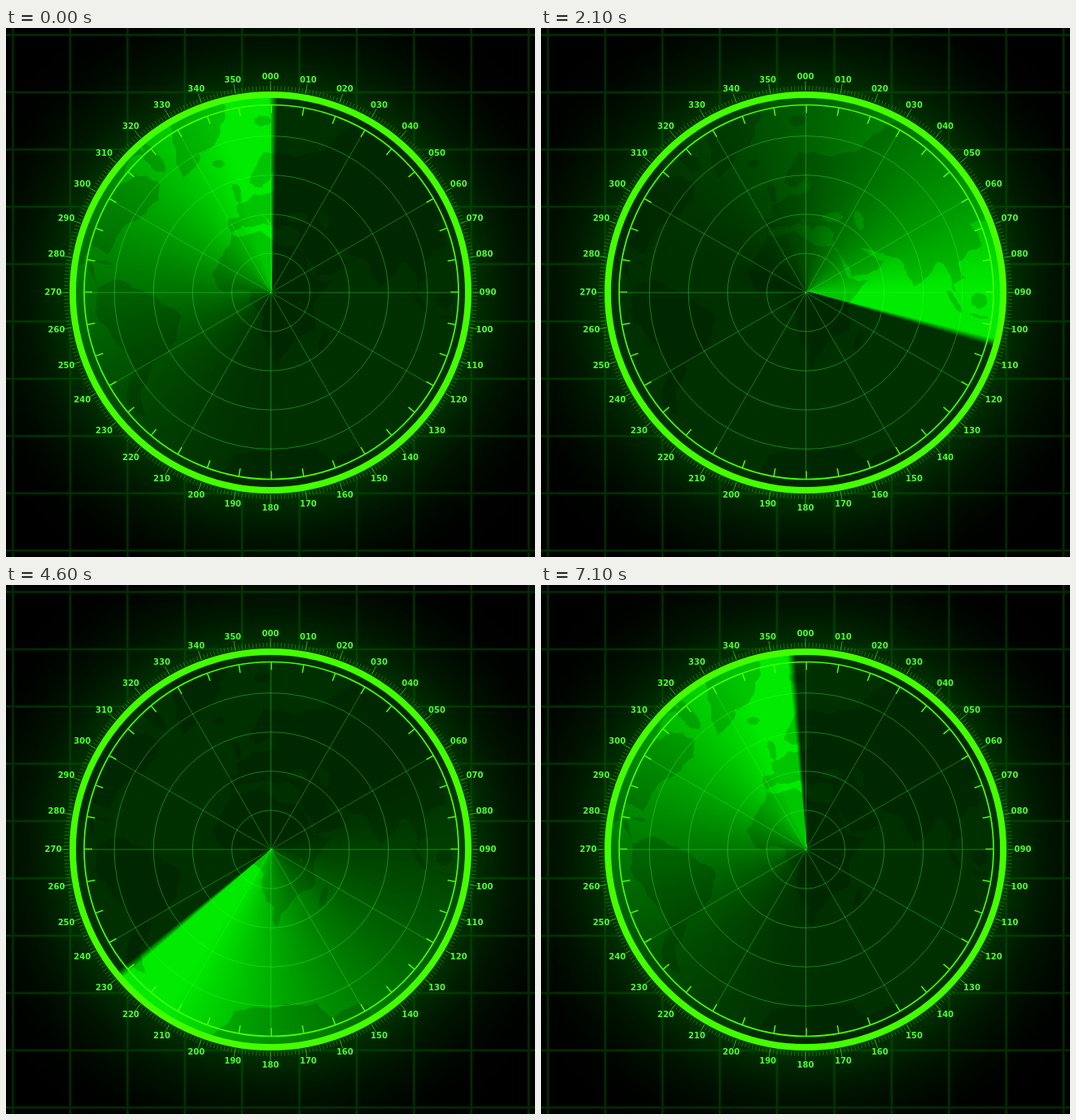
Animation, 650 px wide and 650 px high, one loop 7200 ms. Source, as an HTML page with a canvas:

```html
<!DOCTYPE html>
<html lang="en">
<head>
<meta charset="utf-8">
<title>Radar sweep</title>
<style>
  html, body { margin: 0; width: 100%; height: 100%; overflow: hidden; background: #000; }
  canvas { display: block; }
</style>
</head>
<body>
<canvas id="radar" width="650" height="650"></canvas>
<script>
const ctx = document.getElementById('radar').getContext('2d');
const SIZE = 650, C = SIZE / 2, TAU = Math.PI * 2, RAD = Math.PI / 180;
const STEP_MS = 100, STEPS = 72;
const LIME = '#4f0';

let seed = 7;
function random() {
  seed = seed * 16807 % 2147483647;
  return seed / 2147483647;
}

// Land masses: a few key points joined by seeded, rough coastlines.
const world = new Path2D();

function coast([x1, y1], [x2, y2], depth) {
  if (!depth) return world.lineTo(x2, y2);
  const shift = (random() - 0.5) * 0.3;
  const mid = [(x1 + x2) / 2 - (y2 - y1) * shift, (y1 + y2) / 2 + (x2 - x1) * shift];
  coast([x1, y1], mid, depth - 1);
  coast(mid, [x2, y2], depth - 1);
}

function land(points) {
  world.moveTo(...points[0]);
  points.forEach((p, i) => coast(p, points[(i + 1) % points.length], 3));
  world.closePath();
}

function continent(text) {
  land(text.split(' ').map(pair => pair.split(',').map(Number)));
}

function island(x, y, rx, ry, tilt = 0) {
  const points = [];
  for (let a = 0; a < TAU; a += TAU / 7) {
    const u = rx * Math.cos(a), v = ry * Math.sin(a);
    points.push([x + u * Math.cos(tilt) - v * Math.sin(tilt), y + u * Math.sin(tilt) + v * Math.cos(tilt)]);
  }
  land(points);
}

// Eurasia, Africa, Greenland, North America, South America, Antarctica
continent('277,252 273,234 287,232 282,219 304,204 331,198 329,167 314,196 299,190 317,152 ' +
  '350,157 392,150 423,119 560,150 545,238 525,240 541,268 513,287 522,307 507,314 516,333 ' +
  '500,300 488,287 459,318 444,288 411,275 390,268 421,286 402,302 382,307 363,274 361,252 ' +
  '345,243 333,248 314,229 326,242 290,243');
continent('277,253 312,249 333,264 357,267 380,308 402,310 378,345 378,371 333,421 315,376 ' +
  '317,356 300,324 272,326 253,301');
continent('217,185 209,160 180,85 266,85 262,133 238,154');
continent('112,317 104,288 70,300 70,120 170,150 135,196 158,180 188,190 188,212 172,228 140,252 124,278 105,268 95,285');
continent('112,318 133,309 178,327 214,353 208,385 165,445 172,478 152,466 139,390 109,350');
continent('240,560 280,524 382,513 402,531 445,516 450,570');

island(284, 203, 5, 13, -0.3);   // Britain
island(261, 167, 8, 5);          // Iceland
island(315, 114, 11, 7);         // Svalbard
island(180, 160, 23, 9, 0.9);    // Baffin
island(390, 383, 5, 14, 0.35);   // Madagascar
island(508, 336, 17, 4, 0.95);   // Sumatra
island(538, 335, 10, 10);        // Borneo
island(538, 354, 13, 2, 0.15);   // Java
island(120, 288, 10, 2, 0.2);    // Cuba
// Inland seas: holes under the even-odd rule
island(358, 233, 14, 6);
island(391, 236, 6, 13, -0.3);
island(362, 338, 2, 3);

function circle(r, x = 0, y = 0) {
  ctx.beginPath();
  ctx.arc(x, y, r, 0, TAU);
}

function stroke(width, color) {
  ctx.lineWidth = width;
  ctx.strokeStyle = color;
  ctx.stroke();
}

function ring(r, width, color) {
  circle(r);
  stroke(width, color);
}

function ticks(every, from, to, width, color) {
  ctx.beginPath();
  for (let deg = 0; deg < 360; deg += every) {
    const x = Math.sin(deg * RAD), y = -Math.cos(deg * RAD);
    ctx.moveTo(from * x, from * y);
    ctx.lineTo(to * x, to * y);
  }
  stroke(width, color);
}

function centred(x, y, draw) {
  ctx.save();
  ctx.translate(x, y);
  draw();
  ctx.restore();
}

function backdrop() {
  ctx.fillStyle = '#000';
  ctx.fillRect(0, 0, SIZE, SIZE);
  const glow = ctx.createRadialGradient(C, C, 240, C, C, 400);
  for (let t = 0; t <= 1; t += 0.1) glow.addColorStop(t, `rgb(0,${Math.round(54 * (1 - t) ** 2)},0)`);
  ctx.fillStyle = glow;
  ctx.fillRect(0, 0, SIZE, SIZE);
  ctx.beginPath();
  for (let p = 8.5; p < SIZE; p += 70.4) {
    ctx.moveTo(p, 0);
    ctx.lineTo(p, SIZE);
    ctx.moveTo(0, p);
    ctx.lineTo(SIZE, p);
  }
  stroke(3.5, 'rgba(0,90,0,.25)');
  stroke(1.8, 'rgba(0,100,0,.3)');
}

function sweep(heading) {
  circle(240, C, C);
  ctx.fillStyle = '#003000';
  ctx.fill();
  // Soft leading edge, short full-strength part, then a long fading tail.
  const edge = 2.4, hold = 18, tail = 160;
  const beam = ctx.createConicGradient((heading + 1.5 - 90) * RAD, C + 2, C - 1.5);
  beam.addColorStop(0, 'rgba(0,235,0,0)');
  for (let behind = hold + tail; behind >= hold; behind -= 10) {
    const alpha = (1 - (behind - hold) / tail) ** 1.7;
    beam.addColorStop(1 - behind / 360, `rgba(0,235,0,${alpha.toFixed(3)})`);
  }
  beam.addColorStop(1 - edge / 360, 'rgb(0,235,0)');
  beam.addColorStop(1, 'rgba(0,235,0,0)');
  ctx.fillStyle = beam;
  ctx.fill();
  ctx.save();
  ctx.clip();
  ctx.fillStyle = 'rgba(0,0,0,.16)';
  ctx.fill(world, 'evenodd');
  ctx.restore();
}

function polarGrid() {
  for (let i = 1; i <= 4; i++) ring(48.1 * i, 1, 'rgba(50,255,50,.4)');
  ticks(30, 0, 220, 1, 'rgba(50,255,50,.36)');
}

function innerScale() {
  ring(230, 1.7, LIME);
  ticks(10, 230, 220, 1.5, LIME);
}

function outerScale() {
  ticks(1, 248, 254, 1, 'rgba(40,190,0,.5)');
  ticks(10, 248, 260, 1, 'rgba(40,220,0,.7)');
  ring(243, 8, LIME);
  ctx.font = 'bold 10px "DejaVu Sans", sans-serif';
  ctx.textAlign = 'center';
  ctx.fillStyle = '#4bff2d';
  for (let deg = 0; deg < 360; deg += 10) {
    const label = String(deg).padStart(3, '0');
    ctx.fillText(label, 267 * Math.sin(deg * RAD), 2.5 - 265 * Math.cos(deg * RAD));
  }
}

let shown = -1;
function frame() {
  const step = Math.floor(performance.now() / STEP_MS) % STEPS;
  if (step !== shown) {
    shown = step;
    backdrop();
    sweep(step * 360 / STEPS);
    centred(C + 0.5, C, polarGrid);
    centred(C + 1, C - 0.5, innerScale);
    centred(C, C, outerScale);
  }
  requestAnimationFrame(frame);
}
frame();
</script>
</body>
</html>
```
